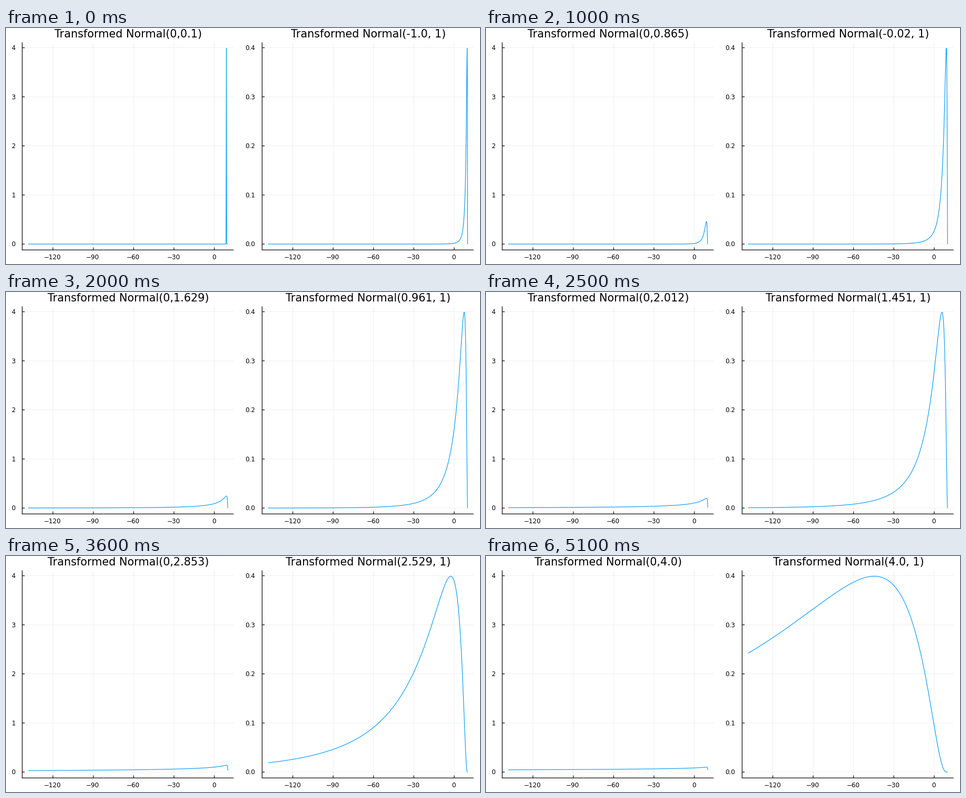
Animation of 900x450 px, one loop 5200 ms. Source, as a matplotlib script:

```python
import numpy as np
import matplotlib.pyplot as plt
from matplotlib.animation import FuncAnimation

W, H, DPI = 900, 450, 100
FRAMES, INTERVAL = 52, 100
PX = 72 / DPI                       # points per pixel
X_SCALE, Y_ZERO, Y_SPAN = 2.553, 412.0, 374.4
TOP, BOTTOM = 27.4, 423.2
X_LEFT, X_RIGHT = -142.86, 14.44    # data limits of both panels
X_TICKS = (-120, -90, -60, -30, 0)

plt.rcParams["font.family"] = "DejaVu Sans"
fig = plt.figure(figsize=(W / DPI, H / DPI), dpi=DPI, facecolor="white")
ax = fig.add_axes([0, 0, 1, 1])
ax.set_xlim(0, W)
ax.set_ylim(H, 0)
ax.axis("off")

y = np.linspace(-5, 5, 1001)
x = 10 - np.exp(y)


def normal_pdf(mu, sigma):
    return np.exp(-0.5 * ((y - mu) / sigma) ** 2) / (sigma * np.sqrt(2 * np.pi))


def segment(xs, ys, width, **style):
    ax.plot(xs, ys, color="black", lw=width * PX, snap=False,
            solid_capstyle="butt", **style)


def label(px, py, text, size, ha):
    return ax.text(px, py, text, fontsize=size * PX, ha=ha, va="baseline",
                   color="black")


class Panel:
    def __init__(self, zero, y_max, y_labels, title_x):
        self.zero, self.y_max = zero, y_max
        left, right = zero + X_LEFT * X_SCALE, zero + X_RIGHT * X_SCALE
        for tick in X_TICKS:
            px = zero + tick * X_SCALE
            segment([px, px], [TOP, BOTTOM], 0.65, alpha=0.1)
            segment([px, px], [BOTTOM - 4.7, BOTTOM], 1.2)
            label(px - 1, 441.3, str(tick).replace("-", "\u2212"), 12, "center")
        for i, text in enumerate(y_labels):
            py = Y_ZERO - Y_SPAN * i / 4
            segment([left, right], [py, py], 0.65, alpha=0.1)
            segment([left, left + 4.7], [py, py], 1.2)
            label(left - 12.8, py + 4.4, text, 12, "right")
        segment([left, right], [BOTTOM, BOTTOM], 1.2)
        segment([left, left], [TOP, BOTTOM + 0.6], 1.2)
        self.curve, = ax.plot([], [], color="#009AF9", lw=1.15 * PX,
                              snap=False, solid_capstyle="butt", zorder=3)
        self.title = label(title_x, 18, "", 20.8, "center")

    def show(self, density, params):
        self.curve.set_data(self.zero + x * X_SCALE,
                            Y_ZERO - density / self.y_max * Y_SPAN)
        self.title.set_text(f"Transformed Normal({params})")


spread = Panel(395.5, 4, [str(i) for i in range(5)], 232.5)
shift = Panel(851.0, 0.4, [f"{i / 10:.1f}" for i in range(5)], 688)


def update(k):
    t = k / (FRAMES - 1)
    sigma, mu = 0.1 + 3.9 * t, -1 + 5 * t
    spread.show(normal_pdf(0, sigma), f"0,{round(sigma, 3)}")
    shift.show(normal_pdf(mu, 1), f"{round(mu, 3)}, 1")
    return spread.curve, spread.title, shift.curve, shift.title


anim = FuncAnimation(fig, update, frames=FRAMES, interval=INTERVAL,
                     init_func=lambda: update(0), repeat=True, repeat_delay=0)
plt.show()
```
